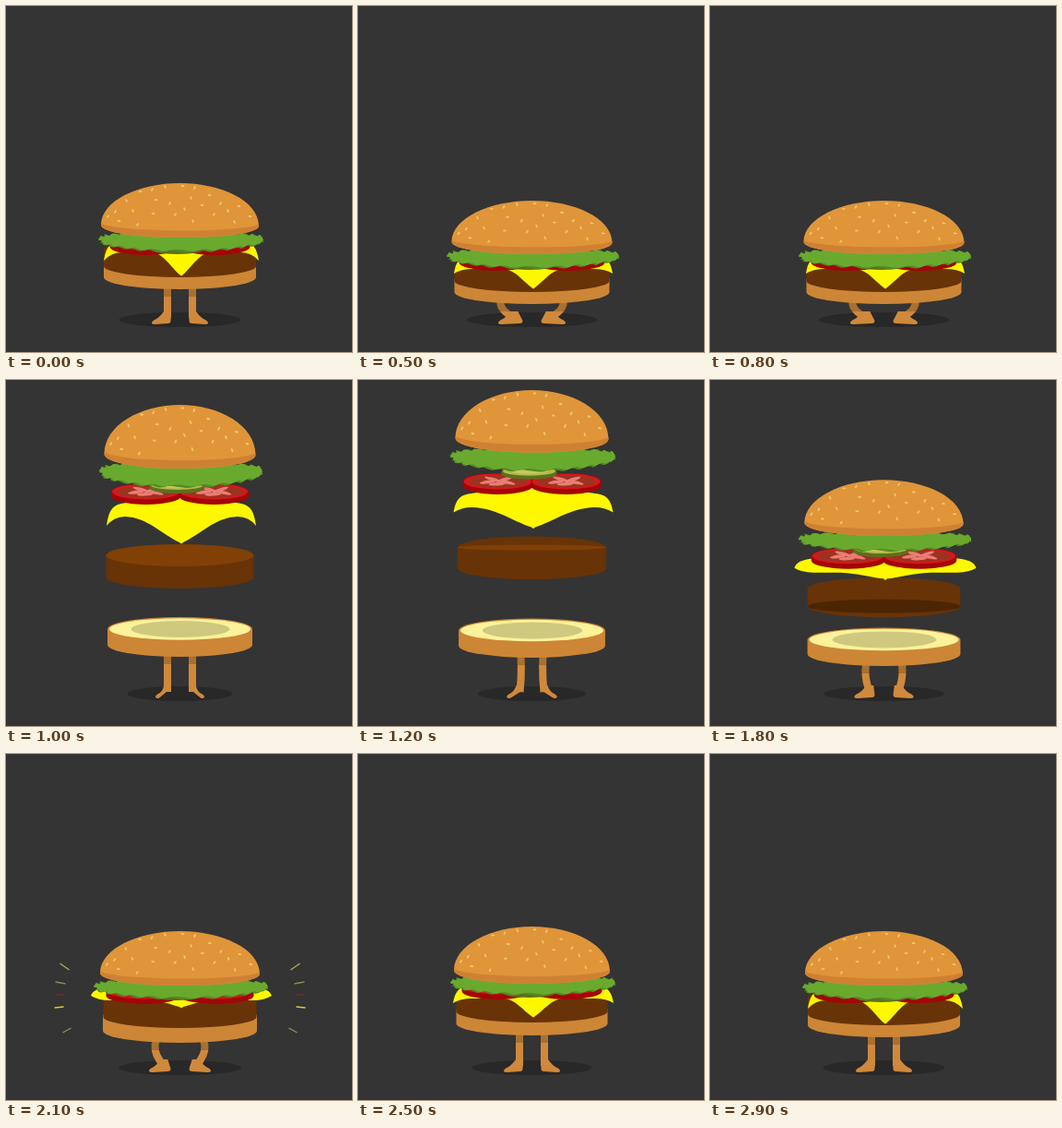
Write an HTML page with a canvas that moves like this. It is 375x375 px and loops after 3000 ms.

```html
<!DOCTYPE html>
<html lang="en">
<head>
<meta charset="utf-8">
<title>Burger</title>
<style>
  html, body { margin: 0; width: 100%; height: 100%; overflow: hidden; background: #343434; }
  canvas { display: block; }
</style>
</head>
<body>
<canvas id="stage" width="375" height="375"></canvas>
<script>
const ctx = document.getElementById('stage').getContext('2d');
const TAU = Math.PI * 2, CX = 188.5, LOOP = 3000, STEP = 100;

// Values per pose: rest, squash, stretch, fall, land, rebound
const poses = {
  bunY: [192, 211, 27, 32.5, 192, 187],
  bunH: [59, 58, 69, 63, 59, 62],
  bunW: [85.5, 87, 82, 85.5, 86.5, 84.5],
  leafY: [246, 264, 90, 94, 245, 241],
  leafH: [20, 20, 26, 20, 20, 20],
  leafW: [88, 92, 87, 91, 93, 88],
  pickleY: [260, 277, 114, 116, 258, 255],
  tomatoY: [256, 273, 121, 130.5, 257, 252],
  tomatoW: [75, 78, 73.5, 76, 79, 75],
  cheeseY: [256, 271, 135, 142, 254, 252],
  wingX: [84, 86, 81, 96, 98, 87],
  wingY: [20, 19, 23, 12, 8, 18],
  edge: [11, 14, 13, 14, 13, 13],
  flare: [32, 32, 61, 66, 30, 32],
  tip: [36, 35, 42, 25, 21, 33],
  pattyY: [264, 282, 190, 191, 266, 260],
  pattyH: [30, 28, 36, 31, 31, 31],
  pattyW: [82.5, 84, 80, 82.5, 83, 82],
  tilt: [0, 0, 12, -12, 0, 0],
  baseY: [280, 296, 270, 279, 284, 278],
  baseH: [27, 27, 30, 28, 29, 27],
  baseW: [82.5, 84, 78.5, 82, 83.5, 82],
  bow: [0, 38, 0, 0, 25, 0],
  toe: [32, 38, 28, 32, 35, 32],
  shadow: [66, 71, 57, 64, 67, 65]
};

// [time, pose, amount away from rest]
const keys = [[0, 0, 1], [500, 1, 1], [800, 1, 1], [1000, 2, 1], [1500, 3, 1],
  [2100, 4, 1], [2250, 1, .6], [2500, 5, 1], [2900, 0, 1], [LOOP, 0, 1]];

const seeds = [[-43, 9], [-30, 7], [-16, 4], [3, 3], [16, 5], [-58, 19], [-26, 18], [-11, 22],
  [12, 16], [32, 13], [-70, 31], [-51, 30], [-29, 33], [-5, 34], [5, 28], [24, 24], [44, 22],
  [52, 30], [64, 25], [37, 34], [14, 41], [-66, 41], [-46, 45], [59, 42], [76, 36], [-78, 36]];

// Burst lines: inner x, y, outer x, y, colour
const rays = [[120, 234, 130, 227, '#b5ad4d'], [124, 249, 135, 247, '#8d8a48'],
  [125, 261, 135, 261, '#74302d'], [126, 274, 136, 275, '#d6cf2e'], [118, 297, 127, 302, '#96924c']];

function poseAt(t) {
  let i = 0;
  while (i < keys.length - 2 && t >= keys[i + 1][0]) i++;
  const [t0] = keys[i], span = keys[i + 1][0] - t0, u = (t - t0) / span;
  const pose = {};
  for (const name in poses) {
    const values = poses[name];
    const value = k => values[0] + (values[keys[k][1]] - values[0]) * keys[k][2];
    const slope = k => {
      const a = keys[k - 1], b = keys[k], c = keys[k + 1];
      if (!a || !c || a[1] === b[1] || b[1] === c[1]) return 0;
      return .7 * (value(k + 1) - value(k - 1)) / (c[0] - a[0]);
    };
    const a = value(i), b = value(i + 1), v = 1 - u;
    pose[name] = a + (b - a) * u * u * (3 - 2 * u)
      + span * u * v * (v * slope(i) - u * slope(i + 1));
  }
  return pose;
}

function fill(color, path) {
  ctx.fillStyle = color;
  ctx.fill(path);
}

function ellipse(color, x, y, rx, ry, angle = 0) {
  const path = new Path2D();
  path.ellipse(x, y, rx, ry, angle, 0, TAU);
  fill(color, path);
}

// Disc seen from the front; h runs from its face centre to its lowest point
function disc(color, x, y, rx, ry, h) {
  const path = new Path2D();
  path.ellipse(x, y, rx, ry, 0, Math.PI, TAU);
  path.ellipse(x, y + h - ry, rx, ry, 0, 0, Math.PI);
  path.closePath();
  fill(color, path);
}

function drawLegs(p) {
  const { bow, toe } = p, hip = p.baseY + p.baseH, ankle = 13.5 + bow * .15;
  const heel = 343 - Math.max(0, 32 - toe) * 1.8;
  const skin = ctx.createLinearGradient(0, hip, 0, hip + 8);
  skin.addColorStop(0, '#a9702f');
  skin.addColorStop(.99, '#a9702f');
  skin.addColorStop(1, '#d0893c');
  for (const side of [-1, 1]) {
    ctx.save();
    ctx.translate(CX, 0);
    ctx.scale(side, 1);
    ctx.strokeStyle = skin;
    ctx.lineWidth = 8;
    ctx.beginPath();
    ctx.moveTo(13.5, hip - 20);
    ctx.quadraticCurveTo(13.5 + bow, (hip + 318) / 2, ankle, 338);
    ctx.stroke();
    fill('#d0893c', new Path2D(`M${ankle - 4} 331L10 ${heel - 2}Q10 ${heel + 1} 13 ${heel + 1}
      L${toe - 5} 345Q${toe + 1} 345 ${toe - 3} 341Q${toe - 10} 338 ${ankle + 4} 331Z`));
    ctx.restore();
  }
}

function drawBase(p) {
  disc('#cc8636', CX, p.baseY, p.baseW, 13, p.baseH);
  ellipse('#fbf29a', CX, p.baseY, p.baseW - 2, 11.7);
  ellipse('#cfc97f', CX + .5, p.baseY, p.baseW * .68, 9);
}

function drawPatty(p) {
  const { pattyY: y, pattyW: w, pattyH: h, tilt } = p;
  disc('#683307', CX, y, w, 12, h);
  if (tilt > 0) ellipse('#814006', CX, y, w, tilt);
  else ellipse('#4c2503', CX, y + h - 12, w, -tilt);
}

function drawCheese(p) {
  const { wingX: x, wingY: y, edge, flare, tip } = p;
  ctx.translate(CX + 1.5, p.cheeseY);
  for (const side of [-1, 1]) {
    ctx.save();
    ctx.scale(side, 1);
    fill('#fdf800', new Path2D(`M-.5 -8Q30 -8 ${x - 16} -1C${x - 5} 1 ${x - 2} ${y * .4} ${x} ${y}
      Q${x - 8} ${edge} ${x - 20} ${edge}L${flare} ${edge}
      C${flare * .6} ${edge + 1} ${flare * .35} ${edge + (tip - edge) * .65} 2 ${tip - 1}Q0 ${tip + 1} -.5 ${tip}Z`));
    ctx.restore();
  }
  ctx.translate(-CX - 1.5, -p.cheeseY);
}

function drawTomatoes(p) {
  const r = p.tomatoW / 2, y = p.tomatoY;
  for (const side of [-1, 1]) {
    const x = CX + side * r;
    disc('#a30508', x, y, r + 1, 9, 14);
    ellipse('#d3191d', x, y, r, 8.5);
    ellipse('#9c3320', x, y, r - 5, 6.5);
    for (let i = 0; i < 5; i++) {
      const a = i * TAU / 5 + .4;
      ellipse('#ea7d74', x + Math.cos(a) * 11, y + Math.sin(a) * 2.8, 9, 1.8, Math.sin(a) * Math.cos(a) * .6);
    }
  }
}

function drawPickle(p) {
  const x = CX - 3, y = p.pickleY;
  disc('#5c701f', x, y, 30, 6, 9);
  ellipse('#b4ba45', x, y, 28.5, 5);
  ellipse('#c6c75f', x, y, 20, 3);
}

function drawLettuce(p) {
  const { leafY: y, leafH: h, leafW: w } = p;
  const layer = (color, depth, phase) => {
    const path = new Path2D();
    for (let i = 0; i <= 180; i++) {
      const a = i * TAU / 180, c = Math.cos(a), s = Math.sin(a);
      const ruffle = 1 + Math.sin(i * 1.05 + phase) * .012 + Math.sin(i * .56) * .012;
      const sag = h * .35 * (1 - c * c);
      path.lineTo(CX + 1 + w * Math.sign(c) * Math.abs(c) ** .8 * ruffle,
        y + h * .36 + (s > 0 ? sag + h * .29 * depth * s ** .4 : h * .34 * -(Math.abs(s) ** .4)) + Math.sin(i * .9 + phase) * 1.1);
    }
    fill(color, path);
  };
  layer('#528c22', 1, 0);
  layer('#69aa2e', .8, 1.2);
}

function drawBun(p) {
  ctx.save();
  ctx.translate(CX, p.bunY);
  ctx.scale(p.bunW / 85.5, p.bunH / 59);
  const dome = new Path2D('M-85.5 45C-85 19 -45 0 0 0C45 0 85 19 85.5 46C86 55 43 59 0 59C-43 59 -86 54 -85.5 45Z');
  fill('#e09539', dome);
  ctx.save();
  ctx.clip(dome);
  fill('#cf8133', new Path2D('M-87 43C-70 54 70 54 87 44V60H-87Z'));
  ctx.restore();
  seeds.forEach(([x, y], i) => ellipse('#f3c873', x, y, 2, .95, i * 2.1));
  ctx.restore();
}

function drawRays(t) {
  const age = (t - 2100) / 200;
  if (age < 0 || age >= 1) return;
  ctx.save();
  ctx.globalAlpha = 1 - age;
  ctx.lineWidth = 1.3;
  for (const side of [-1, 1]) for (const [x0, y0, x1, y1, color] of rays) {
    const dx = (x1 - x0) * age, dy = (y1 - y0) * age;
    ctx.strokeStyle = color;
    ctx.beginPath();
    ctx.moveTo(CX + side * (x0 + dx * 1.4), y0 + dy * 1.4);
    ctx.lineTo(CX + side * (x1 + dx), y1 + dy);
    ctx.stroke();
  }
  ctx.restore();
}

function draw(now) {
  const t = Math.floor(now % LOOP / STEP) * STEP;
  const p = poseAt(t);
  ctx.fillStyle = '#343434';
  ctx.fillRect(0, 0, 375, 375);
  ellipse('#282828', CX, 340, p.shadow, 8);
  for (const part of [drawLegs, drawBase, drawPatty, drawCheese, drawTomatoes, drawPickle, drawLettuce, drawBun]) part(p);
  drawRays(t);
}

const start = performance.now();
function tick() {
  draw(performance.now() - start);
  requestAnimationFrame(tick);
}
tick();
</script>
</body>
</html>
```
